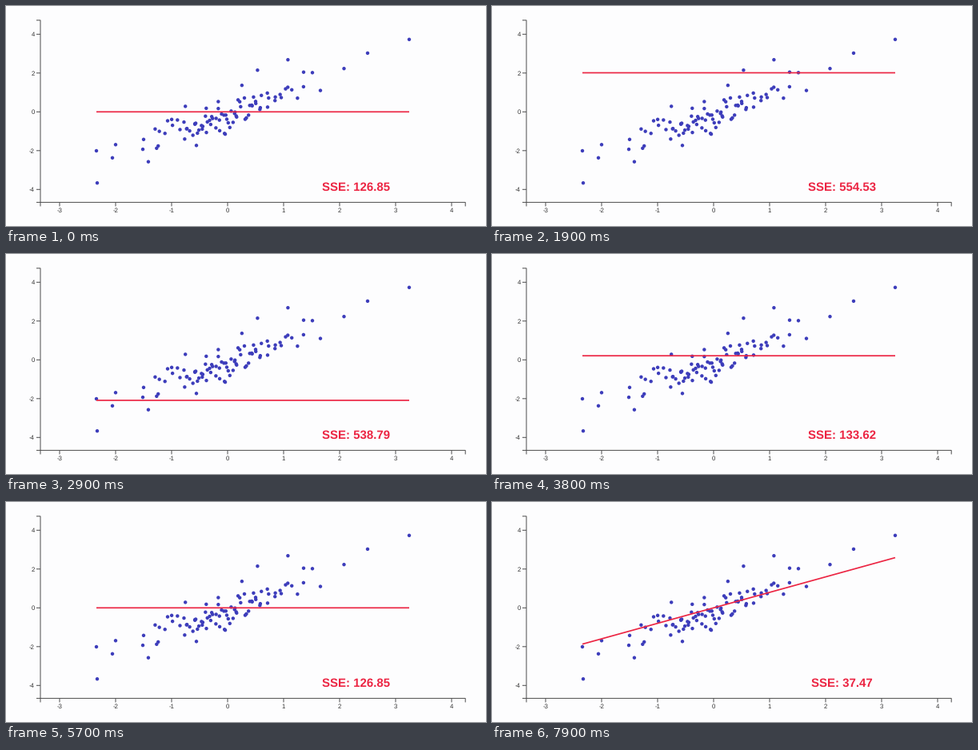
Write a matplotlib script that moves like this. It is 600x275 px and loops after 8000 ms.

```python
import numpy as np
import matplotlib.pyplot as plt
from matplotlib.animation import FuncAnimation
from matplotlib.collections import PatchCollection
from matplotlib.patches import Circle

plt.rcParams["text.hinting"] = "none"

WIDTH, HEIGHT, DPI = 600, 275, 100
FRAMES, INTERVAL = 80, 100
PX = 72 / DPI  # points per pixel
INK, BLUE, RED = "#4d4d4d", "#3d3dbb", "#ec2543"
ORIGIN_X, ORIGIN_Y, UNIT_X, UNIT_Y = 277, 132.3, 70, 24.25
AXIS_X, AXIS_Y, AXIS_TOP, AXIS_RIGHT, TICK = 43, 245.4, 17.8, 574.2, 5
LINE_X = np.array([113, 504])

# Points that stand apart from the cloud.
OUTLIERS = [
    (113, 181), (114, 221.2), (133, 189.8), (137, 173.3), (172, 166.8),
    (188.3, 177.8), (224.2, 125.4), (238, 174.3), (314.4, 80.2),
    (352.4, 67.2), (372, 82.7), (383, 83.3), (393, 105.6), (422.5, 78.2),
    (452, 58.9), (504, 41.8),
]

# (time in ms, value) where each dragged parameter pauses or turns
INTERCEPT = [
    (300, 0), (1200, 1.91), (1900, 2.0128), (2100, 2.11), (2900, -2.0864),
    (3172.4, -2.0864), (4100, 0.96), (4200, 0.96), (5100, 0),
]
SLOPE = [(6300, 0), (7311.4, 1.8), (7900, 0.798)]


def cloud(count=82):
    """Correlated points, evenly spread in the middle and thinner outward."""
    rng = np.random.default_rng(4)
    spread = np.linspace(-1, 1, count)
    x = 272 + 60 * spread + 40 * spread ** 5 + rng.normal(0, 1.5, count)
    y = ORIGIN_Y + 2 - 0.34 * (x - ORIGIN_X) + rng.normal(0, 11, count)
    return list(zip(x, y))


def glide(keys, t):
    """Smoothstep from key to key, held at both ends."""
    times, values = np.array(keys, float).T
    i = np.clip(np.searchsorted(times, t, side="right"), 1, len(keys) - 1)
    u = np.clip((t - times[i - 1]) / (times[i] - times[i - 1]), 0, 1)
    return values[i - 1] + (values[i] - values[i - 1]) * u * u * (3 - 2 * u)


def squared_error(slope, intercept):
    return (126.85 + 100 * intercept ** 2 + 11.2 * intercept
            + 92.619 * slope ** 2 - 2 * 92.957 * slope)


fig = plt.figure(figsize=(WIDTH / DPI, HEIGHT / DPI), dpi=DPI,
                 facecolor="#fdfdfe")
ax = fig.add_axes([0, 0, 1, 1])
ax.set(xlim=(0, WIDTH), ylim=(HEIGHT, 0))
ax.axis("off")


def stroke(xs, ys):
    ax.plot(xs, ys, color=INK, lw=PX, snap=False, solid_capstyle="butt",
            solid_joinstyle="miter")


def label(x, y, text, align):
    ax.text(x, y, text, family="Liberation Sans", fontsize=7.8 * PX,
            color="#333333", ha=align, va="baseline")


left, below = AXIS_X - TICK, AXIS_Y + TICK
stroke([left, AXIS_X, AXIS_X, left], [AXIS_TOP, AXIS_TOP, AXIS_Y, AXIS_Y])
stroke([AXIS_X, AXIS_X, AXIS_RIGHT, AXIS_RIGHT],
       [below, AXIS_Y, AXIS_Y, below])
for value in range(-3, 5):
    x = ORIGIN_X + UNIT_X * value
    stroke([x, x], [AXIS_Y, below])
    label(x, 257.8, str(value), "center")
for value in range(-4, 5, 2):
    y = ORIGIN_Y - UNIT_Y * value
    stroke([left, AXIS_X], [y, y])
    label(36, y + 2.8, str(value), "right")

dots = [Circle(point, 2.2) for point in OUTLIERS + cloud()]
ax.add_collection(PatchCollection(dots, facecolor=BLUE, edgecolor="none",
                                  zorder=3))
fit, = ax.plot([], [], color=RED, lw=1.7 * PX, solid_capstyle="butt",
               snap=False, zorder=4)
score = ax.text(437.3, 230.5, "", family="Liberation Sans", weight="bold",
                fontsize=15 * PX, color=RED, ha="center", va="baseline")


def draw(frame):
    t = frame * INTERVAL
    intercept, slope = glide(INTERCEPT, t), glide(SLOPE, t)
    heights = intercept + slope * (LINE_X - ORIGIN_X) / UNIT_X
    fit.set_data(LINE_X, ORIGIN_Y - UNIT_Y * heights)
    score.set_text(f"SSE: {squared_error(slope, intercept):.2f}")
    return fit, score


animation = FuncAnimation(fig, draw, frames=FRAMES, interval=INTERVAL,
                          repeat=True, repeat_delay=0)
plt.show()
```
